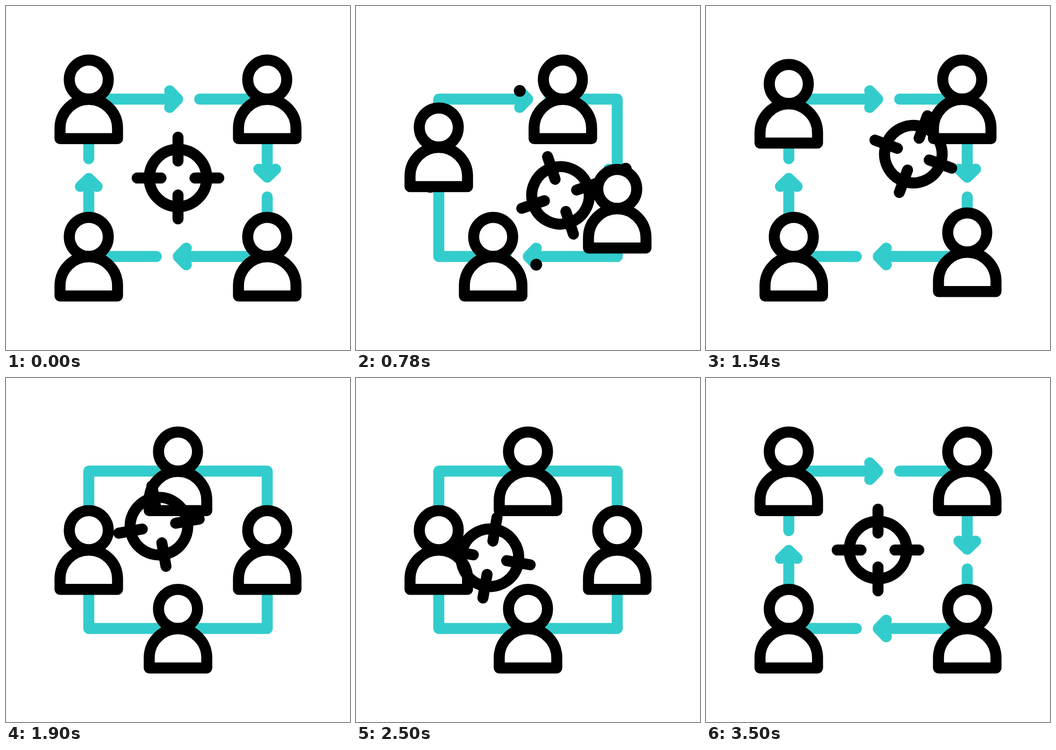
Animation of 640 by 640 pixels, one loop 3.6 s. Source, as an HTML page:

```html
<!DOCTYPE html>
<html lang="en">
<head>
<meta charset="utf-8">
<title>Target group</title>
<style>
  html, body { margin: 0; height: 100%; overflow: hidden; background: #fff; }
  svg { display: block; width: 100vw; height: 100vh; }
  .line { fill: none; stroke-width: 20.5; stroke-linecap: round; stroke-linejoin: round; }
</style>
</head>
<body>
<svg viewBox="0 0 640 640">
  <defs>
    <g id="person" fill="#fff" stroke="#000" stroke-width="20.5" stroke-linejoin="round">
      <path d="M-53.5 73.5V54a53.5 53.5 0 0 1 107 0V73.5Z"/>
      <circle cy="-36.5" r="36.3"/>
    </g>
  </defs>
  <g id="track">
    <g class="line" stroke="#3cc">
      <path d="M154 284V173.3H319.5m-15-15.5l15 15.5l-15 15.5"/>
      <path d="M360.3 173.3H486V318.5m-15.5-15l15.5 15l15.5-15"/>
    </g>
    <g class="dots">
      <circle cx="304.7" cy="158" r="11"/>
      <circle cx="501.8" cy="302.8" r="11"/>
    </g>
  </g>
  <use href="#track" transform="rotate(180 320 319.65)"/>
  <use class="person" href="#person" data-corner="0"/>
  <use class="person" href="#person" data-corner="2"/>
  <g id="sight" class="line" stroke="#000">
    <circle r="53.5"/>
    <path d="M0-76V-31.5M0 76V31.5M-76 0H-31.5M76 0H31.5"/>
  </g>
  <use class="person" href="#person" data-corner="1"/>
  <use class="person" href="#person" data-corner="3"/>
</svg>
<script>
const LOOP = 3600, TICK = 20, STEP = 600;
const WALK_START = 400, SIGHT_START = 300, SIGHT_END = 3500;
const SWING = 20.6;

const people = document.querySelectorAll('.person');
const sight = document.getElementById('sight');
const dots = document.querySelector('.dots');

const clamp = (v, lo, hi) => Math.min(hi, Math.max(lo, v));
const ease = p => p * p * (3 - 2 * p);
const mix = (a, b, k) => a.map((v, i) => v + (b[i] - v) * k);

// corners run clockwise from the top left
const corner = n => [n % 4 % 3 ? 486 : 154, n % 4 > 1 ? 466 : 173.3];

// the sight roams between these offsets, swinging to the other side at each one
const rest = [0, 0, 0];
const stops = [[0, 30], [67.5, 32.6], [67.5, -44.4], [-71.5, -44.4], [-70.5, 35], [-74, -37]];
const swing = i => i && (i % 2 ? -SWING : SWING);
const keys = [
  { at: 0, pose: rest },
  ...stops.map((p, i) => ({ at: SIGHT_START + i * STEP, pose: [...p, swing(i)] })),
  { at: SIGHT_END, pose: rest },
  { at: LOOP, pose: rest }
];

function draw(t) {
  const walk = clamp((t - WALK_START) / STEP, 0, 4);
  const step = Math.floor(walk);
  const k = ease(walk - step);
  for (const person of people) {
    const from = +person.dataset.corner + step;
    const [x, y] = mix(corner(from), corner(from + 1), k);
    person.setAttribute('transform', `translate(${x} ${y})`);
  }
  dots.style.display = k > 0.5 && k < 0.9 ? '' : 'none';

  const next = keys.findIndex(key => key.at > t);
  const a = keys[next - 1], b = keys[next];
  const [x, y, angle] = mix(a.pose, b.pose, ease((t - a.at) / (b.at - a.at)));
  sight.setAttribute('transform', `translate(${320 + x} ${320 + y}) rotate(${angle})`);
}

const start = performance.now();
function tick() {
  const t = (performance.now() - start) % LOOP;
  draw(Math.floor(t / TICK) * TICK);
  requestAnimationFrame(tick);
}
tick();
</script>
</body>
</html>
```
